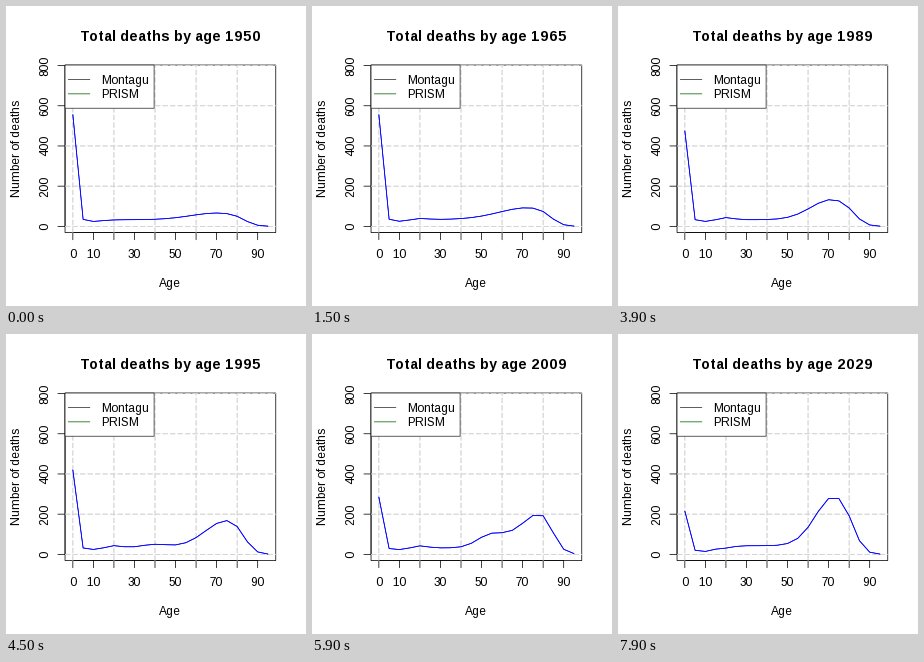
Write a matplotlib script that moves like this. It is 300 px wide and 300 px high and loops after 8000 ms.

```python
import matplotlib.pyplot as plt
import numpy as np
from matplotlib.animation import FuncAnimation
from matplotlib.patches import Rectangle

SIZE, DPI = 300, 72
LEFT, RIGHT, TOP, BOTTOM = 59.04, 269.76, 59.04, 226.56
LINE = 14.4  # height of one margin line
FRAMES, START = 80, 1950
AGES = np.arange(0, 100, 5)
GREY = "#2a2a2a"

plt.rcParams["font.family"] = "Liberation Sans"
plt.rcParams["font.size"] = 12
plt.rcParams["text.hinting_factor"] = 1  # whole-pixel letter spacing


def track(*points):
    """Straight-line path through (year, value) points."""
    years, values = zip(*points)
    return lambda year: np.interp(year, years, values)


def bell(x, mid, width):
    return np.exp(-((x - mid) / width) ** 2)


infant = track((1950, 526), (1965, 525), (1979, 408), (1989, 445),
               (2002, 326), (2009, 256), (2029, 183))
base = track((1950, 33), (1965, 34), (1979, 24), (1989, 33),
             (2009, 32), (2029, 43))
child = track((2009, 0.28), (2029, 0.7))
youth = track((1950, 0), (1979, 0.35), (2009, 0.35), (2029, -0.2))
old = track((1950, 34), (1989, 102), (2002, 188), (2029, 250))
old_age = track((1950, 71), (1979, 76), (1989, 72), (2002, 81),
                (2009, 83), (2029, 73))
spread = track((1950, 19), (1979, 23), (1989, 15), (2009, 18), (2029, 13))
boom = track((1989, 0), (2009, 56), (2029, 0))


def deaths(year):
    a = AGES
    early = infant(year) * np.exp(-0.8 * a)
    steady = base(year) * (1 - child(year) * bell(a, 8, 8)
                           + youth(year) * bell(a, 20, 5))
    late = old(year) * bell(a, old_age(year), spread(year))
    boomers = boom(year) * bell(year - a, 1955, 9)
    alive = 1 / (1 + np.exp((a - 84.5) / 2.8))
    return early + (steady + late + boomers) * alive


def px(age):
    return LEFT + (age + 3.8) * (RIGHT - LEFT) / 102.6


def py(count):
    return 220.36 - 0.201 * count


fig = plt.figure(figsize=(SIZE / DPI, SIZE / DPI), dpi=DPI, facecolor="white")
ax = fig.add_axes([0, 0, 1, 1])
ax.set_xlim(0, SIZE)
ax.set_ylim(SIZE, 0)
ax.axis("off")


def stroke(xs, ys, color="black", z=2, **kw):
    return ax.plot(xs, ys, color=color, lw=0.75, snap=False, zorder=z,
                   solid_capstyle="round", solid_joinstyle="round", **kw)[0]


def frame(x0, y0, x1, y1, z, edge="black", fill="none"):
    ax.add_patch(Rectangle((x0, y0), x1 - x0, y1 - y0, facecolor=fill,
                           edgecolor=edge, lw=0.75, snap=False, zorder=z))


def label(x, y, text, ha="center", **kw):
    return ax.text(x, y, text, ha=ha, va="baseline",
                   rotation_mode="anchor", zorder=6, **kw)


def side_label(line, y, text):
    label(LEFT - line * LINE + 0.6, y, text, rotation=90)


# Axes
frame(LEFT, TOP, RIGHT, BOTTOM, 2)
stroke([px(0), px(90)], [BOTTOM] * 2)
stroke([LEFT] * 2, [py(0), py(800)])
for age in range(0, 100, 10):
    stroke([px(age)] * 2, [BOTTOM, BOTTOM + LINE / 2])
for age in (0, 10, 30, 50, 70, 90):
    label(px(age) - 0.4, BOTTOM + 1.8 * LINE, str(age))
for count in range(0, 1000, 200):
    stroke([LEFT - LINE / 2, LEFT], [py(count)] * 2)
    side_label(1.2, py(count), str(count))

mid_x, mid_y = (LEFT + RIGHT) / 2, (TOP + BOTTOM) / 2
label(mid_x - 0.4, BOTTOM + 3.8 * LINE, "Age")
side_label(3.2, mid_y, "Number of deaths")
title = label(mid_x, 34.7, "", fontsize=14.4, fontweight="bold")

# Grid and curve are each laid down twice, once per series
dash = dict(color="lightgray", z=3, dashes=(7, 3), dash_capstyle="butt")
curves = []
for _ in range(2):
    for age in range(0, 100, 20):
        stroke([px(age)] * 2, [BOTTOM, TOP], **dash)
    for count in range(0, 1000, 200):
        stroke([LEFT, RIGHT], [py(count)] * 2, **dash)
    curves.append(stroke([], [], "blue", z=3.5))

# Legend
frame(LEFT, TOP, 148.1, TOP + 3 * LINE, 4, GREY, "white")
for row, (name, color) in enumerate([("Montagu", GREY),
                                     ("PRISM", "darkgreen")], 1):
    y = TOP + row * LINE
    stroke([62.28, 83.88], [y, y], color, z=5)
    label(94.68, y + 4.3, name, ha="left")


def update(i):
    year = START + i
    title.set_text(f"Total deaths by age {year}")
    for curve in curves:
        curve.set_data(px(AGES), py(deaths(year)))
    return title, *curves


anim = FuncAnimation(fig, update, frames=FRAMES, interval=100,
                     repeat=True, repeat_delay=0, blit=False)
plt.show()
```
